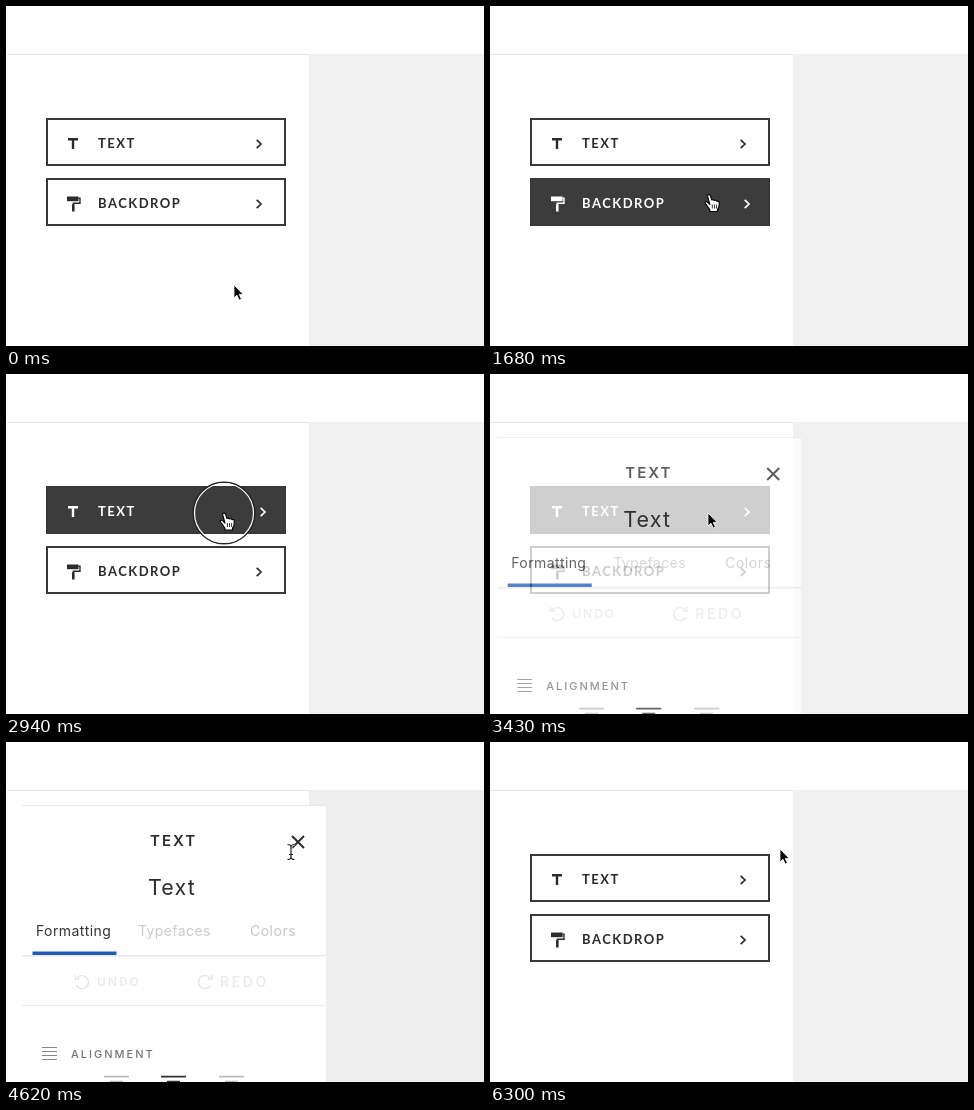
An HTML page that plays this animation: 478 px wide and 340 px high, repeating every 6.72 s.

```html
<!DOCTYPE html>
<html lang="en">
<head>
<meta charset="utf-8">
<title>Menu and text panel</title>
<style>
  html, body { margin: 0; width: 100%; height: 100%; overflow: hidden; background: #fff; }
  svg { display: block; width: 478px; height: 340px; }
  .label { font: 700 13px Lato, sans-serif; letter-spacing: 1.5px; }
  .panel text { font-family: Inter, sans-serif; }
  .line { fill: none; stroke-linecap: butt; }
</style>
</head>
<body>
<svg viewBox="0 0 478 340" xmlns="http://www.w3.org/2000/svg">
  <rect width="478" height="340" fill="#fff"/>
  <rect id="stage" x="303" y="48" width="175" height="292"/>
  <path d="M0 48.5H303" stroke="#e4e4e4"/>
  <g id="menu"></g>
  <g id="panel" class="panel"></g>
  <g id="ring" class="line">
    <circle r="30.8" stroke="#222" stroke-width="1.4"/>
    <circle r="29.5" stroke="#fff" stroke-width="1.2"/>
  </g>
  <g id="cursor">
    <path id="arrow" d="M0 0V13L3 10.2L5.2 15L7.4 14L5.2 9.4H9.2Z"
      fill="#000" stroke="#fff" stroke-width=".8"/>
    <g id="hand" stroke="#000" stroke-width="1.1" stroke-linejoin="round">
      <path fill="#fff" d="M1 10L-1.2 7.8Q-3 6.6-3.8 7.8Q-4 8.8-2.8 9.8L1 15.2V17H8.5V15.2
        Q10.2 13 10.2 10.5V7.6Q9.6 6 8 6.8Q7.4 5.2 5.4 6Q4.6 4.8 2.8 5.4L1.6 1.2
        Q.6-.4-.9 .4Q-1.6 1-1.2 2.2Z"/>
      <path fill="none" stroke-width=".8" d="M3.4 10V14M5.5 10V14M7.6 10V14"/>
    </g>
    <g id="beam" class="line">
      <path d="M-3.5-7.5Q0-7.5 0-5V5Q0 7.5-3.5 7.5M3.5-7.5Q0-7.5 0-5V5Q0 7.5 3.5 7.5M-2 2.5H2"
        stroke="#fff" stroke-width="2.6"/>
      <path d="M-3.5-7.5Q0-7.5 0-5V5Q0 7.5-3.5 7.5M3.5-7.5Q0-7.5 0-5V5Q0 7.5 3.5 7.5M-2 2.5H2"
        stroke="#222" stroke-width="1.2"/>
    </g>
  </g>
</svg>
<script>
const LOOP = 6720, STEP = 70;
const OPEN = 3110, CLOSE = 5500, SLIDE = 36;
const INK = [43, 43, 43], PALE = [230, 230, 230], WHITE = [255, 255, 255];
const $ = id => document.getElementById(id);

const clamp = v => Math.max(0, Math.min(1, v));
const ramp = (t, start, length) => clamp((t - start) / length);
const mix = (a, b, u) => a + (b - a) * u;
const blend = (a, b, u) => `rgb(${a.map((v, i) => Math.round(mix(v, b[i], u)))})`;
const smooth = u => u * u * (3 - 2 * u);

// Cubic Bezier (.25, .1, .25, 1), solved for x by bisection.
function ease(x) {
  const curve = (a, b, s) => 3 * a * s * (1 - s) ** 2 + 3 * b * s * s * (1 - s) + s ** 3;
  let lo = 0, hi = 1;
  for (let i = 0; i < 20; i++) {
    const mid = (lo + hi) / 2;
    if (curve(.25, .25, mid) < x) lo = mid; else hi = mid;
  }
  return curve(.1, 1, lo);
}

const textIcon = '<path d="M62 20H72V22.4H68.2V31H65.8V22.4H62Z"/>';
const rollerIcon = `<path d="M61 18.5H72.6V23.2H61Z"/><path d="M66 26.3H68.6V33.5H66Z"/>
  <path class="line" d="M72.6 20.2H74V25.3H67.3V27" style="stroke:currentColor" stroke-width="1.4"/>`;

const button = (id, y, label, icon) => `<g id="${id}" transform="translate(0 ${y})" fill="currentColor">
  <rect class="box" x="41" y="1" width="238" height="46" stroke="#383838" stroke-width="2"/>
  ${icon}<text class="label" x="92" y="30">${label}</text>
  <path class="chevron line" d="M250.7 21.8L255 26L250.7 30.2" stroke="currentColor" stroke-width="1.7"/></g>`;

const text = (x, y, size, weight, spacing, color, words) =>
  `<text x="${x}" y="${y}" font-size="${size}" font-weight="${weight}" letter-spacing="${spacing}" fill="${color}">${words}</text>`;
const rule = (d, color, width = 1) => `<path class="line" d="${d}" stroke="${color}" stroke-width="${width}"/>`;
const turn = (x, flip) => `<g transform="translate(${x} 240) scale(${flip} 1)">
  ${rule("M-5 -4A6.5 6.5 0 1 1 -5.6 3.4M-6.7 -7V-3H-2.5", "#e5e5e5", 1.4)}</g>`;
const aligned = (x, color) => rule(`M${x} 334.7H${x + 25}M${x + 6} 339.7H${x + 19}`, color, 1.7);

$("menu").innerHTML = button("text", 112, "TEXT", textIcon) + button("backdrop", 172, "BACKDROP", rollerIcon);
$("panel").innerHTML = `<rect x="16" y="63" width="304" height="277" fill="#fff"/>`
  + rule("M16 63.5H320", "#e9e9e9")
  + text(144, 104, 15, 600, 2, "#2b2b2b", "TEXT")
  + `<path id="cross" class="line" d="M286 94L298 106M298 94L286 106" stroke-width="2"/>`
  + text(142, 153, 21.5, 400, 1.1, "#2b2b2b", "Text")
  + text(30, 194, 14, 400, .4, "#333", "Formatting")
  + text(132, 194, 14, 400, .4, "#cbcbcb", "Typefaces")
  + text(244, 194, 14, 400, .5, "#c6c6c6", "Colors")
  + rule("M16 213.8H320", "#e8e8e8", 1.5)
  + rule("M26.5 211.3H110.5", "#1f5bb5", 3.6)
  + turn(76, 1) + text(91, 244, 12, 600, 2, "#ebebeb", "UNDO")
  + turn(199, -1) + text(214, 245, 14, 600, 2.6, "#ebebeb", "REDO")
  + rule("M16 263.5H320", "#ededed")
  + rule("M36 305.5H51M36 309.5H51M36 313.5H51M36 317.5H51", "#888")
  + text(65, 315.5, 11, 500, 2, "#757575", "ALIGNMENT")
  + aligned(98, "#bcbcbc") + aligned(155, "#333") + aligned(213, "#bcbcbc");

// Pointer stops: time, x, y.
const PATH = [
  [0, 228, 279], [560, 219, 193], [1590, 219, 193], [2100, 218, 139],
  [3920, 218, 139], [4060, 221, 138], [4200, 221, 138],
  [4620, 285, 110], [4830, 288, 108.5], [5040, 290, 107]
];

function pointer(t) {
  const next = PATH.findIndex(p => p[0] > t);
  if (next < 0) return PATH[PATH.length - 1].slice(1);
  const [a, b] = [PATH[next - 1], PATH[next]];
  const u = smooth(ramp(t, a[0], b[0] - a[0]));
  return [mix(a[1], b[1], u), mix(a[2], b[2], u)];
}

function cursorKind(t, y) {
  if (t >= 4900 && t < 5600) return "hand";
  if (t >= 4270 && t < 4900) return "beam";
  const overButton = (y > 112 && y < 160) || (y > 172 && y < 220);
  return t < 3220 && overButton ? "hand" : "arrow";
}

function paintButton(id, hover) {
  const el = $(id);
  el.style.color = blend(INK, WHITE, hover);
  el.querySelector(".box").setAttribute("fill", blend(WHITE, [60, 60, 60], hover));
  el.querySelector(".chevron").setAttribute("transform", `translate(${4 * hover} 0)`);
}

const show = (id, on) => $(id).setAttribute("visibility", on ? "visible" : "hidden");

function draw(time) {
  const t = Math.floor((time % LOOP) / STEP) * STEP;
  const [x, y] = pointer(t);

  paintButton("backdrop", ramp(t, 310, 210) - ramp(t, 1790, 210));
  paintButton("text", t < 4200 ? ramp(t, 1880, 210) : 0);

  const open = t < CLOSE ? ease(ramp(t, OPEN, 700)) : 1 - ease(ramp(t, CLOSE, 310));
  $("panel").setAttribute("opacity", open);
  $("panel").setAttribute("transform", `translate(${-SLIDE * (1 - open)} 0)`);
  $("cross").setAttribute("stroke", blend(INK, PALE, ramp(t, 4830, 210)));
  $("stage").setAttribute("fill", t >= 4200 && t < 5530 ? "#eee" : "#f0f0f0");

  show("ring", t === 2940 || t === 5320);
  $("ring").setAttribute("transform", `translate(${x} ${y})`);
  $("cursor").setAttribute("transform", `translate(${x} ${y})`);
  const kind = cursorKind(t, y);
  for (const id of ["arrow", "hand", "beam"]) show(id, id === kind);
}

const begin = performance.now();
function tick() {
  draw(performance.now() - begin);
  requestAnimationFrame(tick);
}
tick();
</script>
</body>
</html>
```
